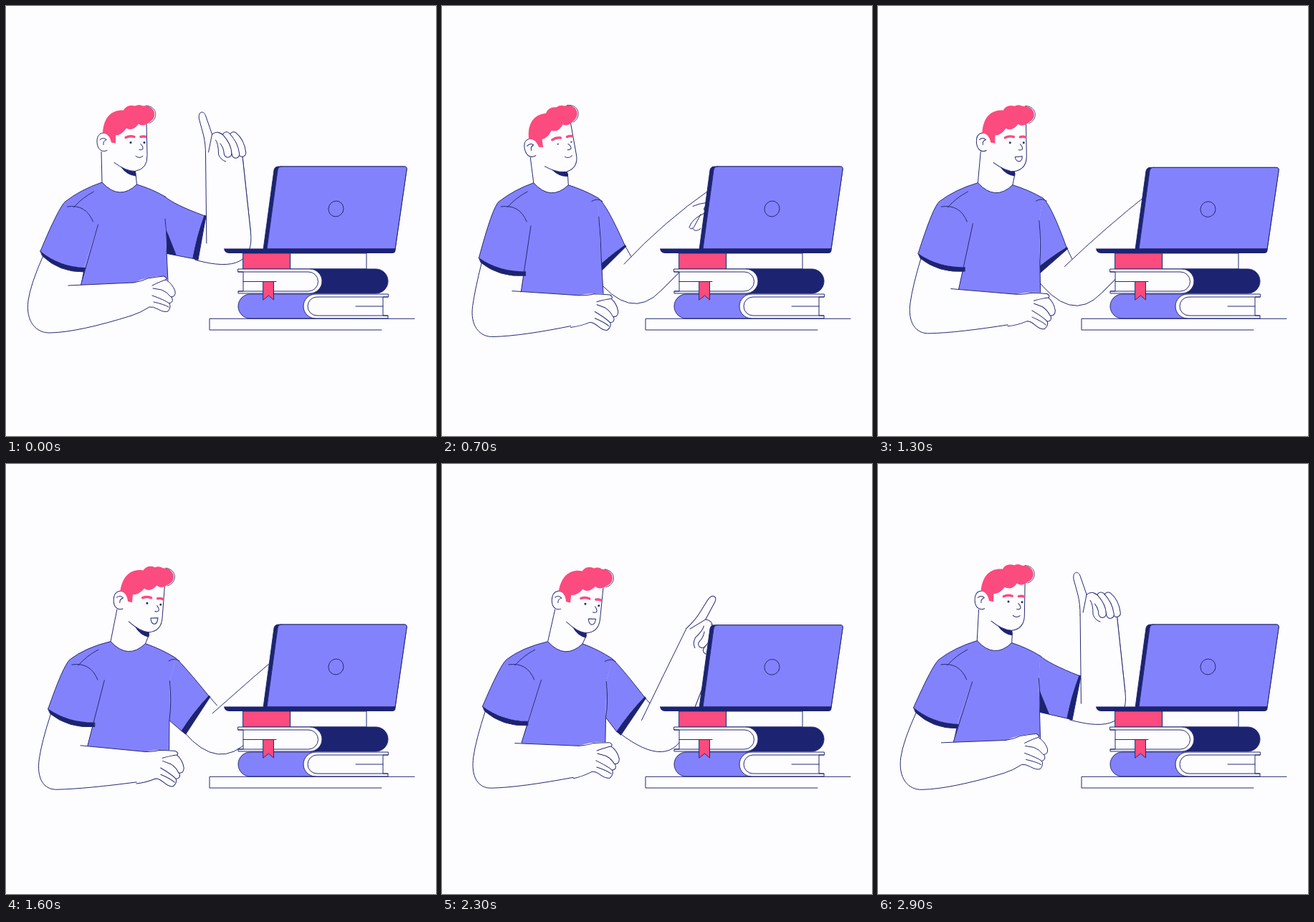
An HTML page with a canvas for the animation above (3 s loop, 600 px wide and 600 px high).

```html
<!DOCTYPE html>
<html lang="en">
<head>
<meta charset="utf-8">
<title>Lesson at the laptop</title>
<style>
html, body { margin: 0; width: 100%; height: 100%; overflow: hidden; background: #fdfcff; }
canvas { display: block; width: 600px; height: 600px; }
</style>
</head>
<body>
<canvas id="stage" width="600" height="600"></canvas>
<script>
const ctx = document.getElementById('stage').getContext('2d');
const LOOP = 3000, STEP = 100;
const PAPER = '#fdfcff', VIOLET = '#8382fd', NAVY = '#1c2371', PINK = '#fc4b7e', LINE = '#252b72';

// Smooth periodic curve through [time, value] points, without overshoot.
function curve(...keys) {
  const n = keys.length;
  const key = k => {
    const turns = Math.floor(k / n), [t, v] = keys[k - turns * n];
    return [t + turns * LOOP, v];
  };
  const slope = k => (key(k + 1)[1] - key(k)[1]) / (key(k + 1)[0] - key(k)[0]);
  const tangent = k => {
    const a = slope(k - 1), b = slope(k);
    return a * b <= 0 ? 0 : 2 * a * b / (a + b);
  };
  return time => {
    let i = n - 1;
    while (keys[i][0] > time) i--;
    const [t0, v0] = key(i), [t1, v1] = key(i + 1), h = t1 - t0, u = (time - t0) / h;
    return v0 + (v1 - v0) * u * u * (3 - 2 * u)
      + h * u * (1 - u) * (tangent(i) * (1 - u) - tangent(i + 1) * u);
  };
}

// The whole figure follows four controls.
const leanAt = curve([0, 0], [700, -.41], [1100, .03], [1600, .8], [2000, 1], [2500, .79], [2900, .28]);
const sleeveAngleAt = curve([0, 26], [700, 61], [1100, 72], [1600, 49], [2000, 46], [2500, 52], [2900, 27]);
const reachAt = curve([0, 0], [700, 1], [2000, 1], [2500, .2], [2900, 0]);
const smileAt = curve([0, 0], [700, 0], [1600, 1], [2500, .9], [2900, 0]);

const clamp = v => Math.max(0, Math.min(1, v));
const add = (p, dx, dy) => [p[0] + dx, p[1] + dy];
const mix = (a, b, u) => [a[0] + (b[0] - a[0]) * u, a[1] + (b[1] - a[1]) * u];
const mid = (a, b) => mix(a, b, .5);
function turn([x, y], degrees, origin = [0, 0]) {
  const a = degrees * Math.PI / 180, c = Math.cos(a), s = Math.sin(a);
  return [origin[0] + x * c - y * s, origin[1] + x * s + y * c];
}
function normal(a, b, size) {
  const dx = b[0] - a[0], dy = b[1] - a[1], length = Math.hypot(dx, dy) || 1;
  return [dy / length * size, -dx / length * size];
}

function poseAt(time) {
  const lean = leanAt(time), reach = reachAt(time), angle = sleeveAngleAt(time);
  const slide = reach * (2 - reach), back = Math.max(0, -lean), sway = Math.abs(lean);
  const p = { lean, reach, angle };

  p.ear = [135 + 29 * lean, 189.5 + 20 * back];
  p.tilt = 8 * lean - 4 * reach * (1 - lean);
  p.eyes = 1 - 1.3 * back;
  p.smile = smileAt(time);

  p.neckL = [134 + 15 * lean, 246 + 2 * sway];
  p.neckR = add(p.neckL, 48.5, 3);
  p.sideTop = [128.5 + 11 * lean, 305 - 4 * lean];
  p.sideEnd = [104.5 + 7 * reach + 3 * lean, 389 + 8 * reach - 5 * lean];
  p.flankTop = [222 + 8 * lean, 297 + 7 * lean];
  p.flankEnd = [226 + 2 * lean, 385 + 18 * reach];
  p.armpit = mix(p.flankTop, p.flankEnd, .55);

  p.shoulderL = [82.5 + 8 * lean, 273];
  p.hemL1 = [48 + 6 * reach + 6 * lean, 342 + 6 * reach - 8 * lean];
  p.hemL2 = add(p.hemL1, 61 + 4 * reach, 23 - 4 * reach);
  p.restInner = [87 + 13 * slide + 5 * lean, 390 + 6 * reach - 4 * lean];
  p.restTop = [178 + 14 * slide + 2 * lean, 386 + 17 * reach - 2 * lean];
  p.restBottom = [175 + 9 * slide + 2 * lean, 432 + 13 * reach - 2 * lean];
  p.restElbow = [31 + 13 * slide + 3 * lean, 411 + 5 * reach - 6 * lean];
  p.restBase = [62 + 10 * slide, 456 + 3 * reach - 6 * lean];

  // Lifted arm: shoulder, elbow and wrist as a jointed chain.
  p.shoulderR = [222 + 15 * lean + 3 * reach, 266 + 6 * sway];
  p.hemR1 = turn([50 + .4 * angle, 0], angle, p.shoulderR);
  p.hemR2 = turn([62, 0], angle + 79, p.hemR1);
  const elbow = turn([100 + .45 * angle, 0], 18 + .8 * angle, p.shoulderR);
  const aim = -92 + 50 * reach, length = 130 + 35 * reach;
  const forearm = (along, across) => turn([along, across], aim, elbow);
  p.innerEnd = forearm(6, -29);
  p.wristIn = forearm(length, -26);
  p.wristOut = forearm(length, 25);
  p.elbowOut = forearm(20, 33);
  p.elbowTurn = forearm(-43, 38);
  p.handTurn = 92 + aim + 38 * reach;

  // Fingertips show beside the screen while he sits back and types.
  const peek = clamp(reach * (1 - lean)), height = Math.min(lean, .1);
  p.knuckle = [390 - 40 * peek, 306 + 65 * height];
  p.thumb = [400 - 55 * peek, 334 + 62 * height];
  const typing = Math.sin(Math.PI * (time - 700) / 900);
  p.lid = time > 700 && time < 2500 ? 1.8 * typing * typing : 0;
  return p;
}

function fill(path, color) {
  ctx.fillStyle = color;
  ctx.fill(new Path2D(path));
}
function line(path, color = LINE, width = 1) {
  ctx.strokeStyle = color;
  ctx.lineWidth = width;
  ctx.stroke(new Path2D(path));
}
function shape(path, color) {
  fill(path, color);
  line(path);
}
function placed(origin, degrees, paint) {
  ctx.save();
  ctx.translate(...origin);
  ctx.rotate(degrees * Math.PI / 180);
  paint();
  ctx.restore();
}

function liveUpperArm(p) {
  const outer = `M${add(p.hemR2, 4, 2)}Q${p.elbowTurn} ${p.elbowOut}L${p.wristOut}`;
  const crease = turn([18, 0], p.angle, p.hemR1);
  fill(`${outer}L${p.wristIn}L${p.innerEnd}L${crease}L${p.hemR1}Z`, PAPER);
  line(outer);
  line(`M${p.hemR1}L${crease}`);
}

function liveForearm(p) {
  const bow = normal(p.innerEnd, p.wristIn, -6 * p.reach * (1 - p.lean));
  const bend = add(mid(p.innerEnd, p.wristIn), -bow[0], -bow[1]);
  const edge = `M${p.innerEnd}Q${bend} ${p.wristIn}`;
  fill(`${edge}L${p.wristOut}L${p.elbowOut}Z`, PAPER);
  line(edge);
  line(`M${p.elbowOut}L${p.wristOut}`);
  placed(p.wristIn, p.handTurn, pointingHand);

  const k = p.knuckle, t = p.thumb;
  line(`M${k}Q${add(k, 9, -4)} ${add(k, 20, -5)}`);
  line(`M${add(t, 22, -20)}Q${add(t, 4, -12)} ${t}Q${add(t, 3, 5)} ${add(t, 7, -1)}L${add(t, 16, -18)}`);
  line(`M${add(t, 5, 2)}Q${add(t, 8, 8)} ${add(t, 16, 2)}`);
}

function pointingHand() {
  const index = 'M0,1Q0,-15 -3,-27L-9,-49C-11,-60 -3,-62 0,-54L9,-28';
  fill(`${index}Q19,-34 34,-28L51,4Z`, PAPER);
  for (const finger of ['M39,-26Q49,-18 51,-2', 'M29,-26Q40,-15 42,0', 'M20,-24Q31,-12 31,-1']) {
    line(finger, LINE, 11.5);
    line(finger, PAPER, 9.5);
  }
  fill('M10,-28Q17,-32 23,-27L26,-16L15,-15Z', PAPER);
  line(index);
  line('M9,-28Q17,-34 23,-28M9,-28L4,-3M14,-20Q18,-15 18,0Q21,8 28,10');
}

function neck(p) {
  const back = turn([-2, 14], p.tilt, p.ear), front = turn([46, 44], p.tilt, p.ear);
  fill(`M${back}L${p.neckL}L${add(mid(p.neckL, p.neckR), 0, 16)}L${p.neckR}L${front}Z`, PAPER);
  line(`M${back}L${p.neckL}M${front}L${p.neckR}`);
}

function shirt(p) {
  const neckline = `Q${add(mid(p.neckL, p.neckR), 0, 25)} ${p.neckL}`;
  const slopeL = `Q${add(p.shoulderL, 22, -17)} ${p.shoulderL}`;
  const slopeR = `Q${add(mid(p.neckR, p.shoulderR), 2, -2)} ${p.shoulderR}`;
  const outerR = `Q${add(p.shoulderR, 12, 11)} ${p.hemR1}`;

  // Far sleeve with its cuff and the shadow under the arm.
  const n = normal(p.hemR1, p.hemR2, 8);
  const hemMid = add(mid(p.hemR1, p.hemR2), -n[0] * .35, -n[1] * .35);
  const cuffEnd = add(p.hemR2, n[0], n[1]), cuffTop = add(p.hemR1, n[0] * .35, n[1] * .35);
  shape(`M${p.hemR1}Q${hemMid} ${p.hemR2}L${cuffEnd}Q${mid(cuffEnd, cuffTop)} ${cuffTop}Z`, NAVY);
  fill(`M${p.shoulderR}${outerR}Q${hemMid} ${p.hemR2}L${p.armpit}L${p.flankTop}Z`, VIOLET);
  line(`M${p.hemR2}L${p.armpit}`);
  const shade = clamp((44 - p.angle) / 18);
  fill(`M${p.armpit}L${add(p.armpit, 0, -32 * shade)}L${mix(p.armpit, p.hemR2, .38 * shade)}Z`, NAVY);

  // Gap between near sleeve and torso.
  const [, top] = p.sideTop, side = mix(p.sideTop, p.sideEnd, (p.hemL2[1] - top) / (p.sideEnd[1] - top));
  fill(`M${p.hemL2}L${side}L${p.sideEnd}Z`, NAVY);
  fill(`M${p.sideTop}L${p.hemL2}L${side}Z`, VIOLET);

  fill(`M${p.neckL}${slopeL}L${p.sideTop}L${p.sideEnd}l0,9L${p.flankEnd}L${p.armpit}L${p.flankTop}`
    + `L${p.shoulderR}L${p.neckR}${neckline}Z`, VIOLET);
  fill(`M${p.neckR}${slopeR}L${p.flankTop}L${p.sideTop}Z`, VIOLET);
  line(`M${p.neckR}${neckline}${slopeL}`);
  line(`M${p.neckR}${slopeR}${outerR}`);
  line(`M${p.flankTop}Q${add(p.flankTop, 3, 30)} ${p.armpit}L${p.flankEnd}`);
  const fold = 1 - shade, s = p.shoulderR;
  line(`M${add(s, -10 * fold, 4 * fold)}Q${add(s, -2, -1)} ${add(s, 5 * fold, 4 * fold)}`);
}

function nearSleeve(p) {
  const hem = add(mid(p.hemL1, p.hemL2), -4, 10), s = p.shoulderL;
  shape(`M${p.hemL1}Q${hem} ${p.hemL2}l0,6Q${add(hem, 0, 8)} ${add(p.hemL1, 3, 7)}Z`, NAVY);
  const outer = `M${s}Q${add(s, -9, 8)} ${p.hemL1}`;
  fill(`${outer}Q${hem} ${p.hemL2}L${p.sideTop}L${add(s, 30, -10)}Z`, VIOLET);
  line(outer);
  line(`M${p.sideTop}L${p.sideEnd}`);
  line(`M${add(s, 3, 7)}Q${add(s, 29, 3)} ${add(s, 39, 28)}`);
  line(`M${add(s, 12, 8)}Q${add(s, 23, -5)} ${add(s, 40, -14)}`);
}

function restingArm(p) {
  const e = p.restElbow, b = p.restBase;
  const outer = `M${add(p.hemL1, 4, 6)}Q${add(e, 3, -22)} ${e}C${[e[0] - 4, b[1] - 16]} ${[b[0] - 20, b[1] + 1]} ${b}`
    + `Q${add(b, 40, -1)} ${p.restBottom}`;
  fill(`${outer}L${p.restTop}L${p.restInner}L${p.hemL2}Z`, PAPER);
  line(outer);
  line(`M${p.restInner}L${p.restTop}`);
  placed(p.restTop, 11 * p.reach, restingHand);
  // Cover the seam between hand and wrist.
  fill(`M${add(p.restTop, -6, 1.5)}L${add(p.restTop, 5, 2)}L${add(p.restBottom, 5, -4)}L${add(p.restBottom, -6, -1)}Z`, PAPER);
}

function restingHand() {
  fill('M0,0Q20,-9 42,-9L47,-4L58,12L57,19L54,29L48,41L22,34L-3,46Z', PAPER);
  line('M0,0Q12,-2 20,-6Q32,-8 42,-9Q48,-7 45,-4Q38,-2 26,4');
  line('M45,-4Q54,1 58,12Q59,20 52,20Q47,13 39,10L27,8');
  line('M53,20Q57,27 50,29Q43,24 26,18');
  line('M50,29Q53,34 48,40Q43,42 34,37Q27,33 22,34Q10,42 -3,46');
  line('M49,34Q42,30 28,27');
}

function head(p) {
  const face = 'M61,-27L62,18Q63,38 45,41Q32,41 16,29';
  fill('M27,36Q36,41 46,41L46,48Q34,47 25,35Z', NAVY);
  fill(`${face}L3,13L0,-12Z`, PAPER);
  line(face);
  shape('M10,-7C4,-16 -9,-14 -8,1C-7,12 0,15 6,12', PAPER);
  line('M-4,-3Q1,-7 5,-3M5,-3Q0,-1 1,4');
  fill('M0,-12C1,-35 13,-45 29,-44Q34,-53 45,-50Q51,-53 56,-50C72,-52 78,-35 66,-28'
    + 'C59,-22 54,-22 50,-25Q42,-14 33,-19Q26,-9 18,-9L18,2L12,1Q9,-12 0,-12Z', PINK);
  line('M60,-50.5C77,-50 78,-31 65,-26', LINE, .8);
  line('M32,-6Q38,-9 44,-7M53,-7Q57,-8 60,-7', PINK, 3.4);
  ctx.fillStyle = LINE;
  for (const x of [39, 58]) {
    ctx.beginPath();
    ctx.ellipse(x, 1, 1.5, 1.5 * p.eyes, 0, 0, Math.PI * 2);
    ctx.fill();
  }
  line('M53,3Q57,7 56,10Q54,12 51,11');
  const drop = 7 * p.smile;
  if (drop > .4) line(`M46,21L56,20Q56,${22 + drop} 51,${22 + drop}Q47,${21 + drop} 46,21`);
  else line('M46,20Q51,24 56,20');
}

function laptop(p) {
  ctx.save();
  ctx.translate(0, 340);
  ctx.scale(1, 1 - p.lid / 116);
  ctx.translate(0, -340);
  shape('M380,224Q375,224 374,229L359,340H543L559,229Q560,224 556,224Z', NAVY);
  shape('M384,224H556Q560,224 559,229L543,339H364L379,229Q380,224 384,224Z', VIOLET);
  ctx.beginPath();
  ctx.ellipse(460.5, 283, 10.5, 11, .4, 0, Math.PI * 2);
  ctx.stroke();
  ctx.restore();
  fill('M304,338.5H543.5V341Q543,345 539,345H311Q305,345 304,338.5Z', NAVY);
}

function books() {
  shape('M397,345H503V367H397Z', PAPER);
  shape('M331,345H396.5V367H331Z', PINK);
  shape('M424,367H516A17 17 0 0 1 516,401H424Z', NAVY);
  shape('M324,367H424A17 17 0 0 1 424,401H324V398H331V371H324Z', PAPER);
  line('M324,371H422A13.5 13.5 0 0 1 422,398H324M331,384.5H377');
  shape('M432,402H341A17 17 0 0 0 341,436H432Z', VIOLET);
  shape('M533,402H432A17 17 0 0 0 432,436H533V432H526V406H533Z', PAPER);
  line('M533,406H434A13 13 0 0 0 434,432H533M488,419H526');
  shape('M359,384.5H373.5V410L366.5,404L359,410Z', PINK);
  line('M570,436.3H284V452H524');
}

function render(time) {
  const p = poseAt(time);
  ctx.fillStyle = PAPER;
  ctx.fillRect(0, 0, 600, 600);
  ctx.lineCap = ctx.lineJoin = 'round';
  liveUpperArm(p);
  neck(p);
  placed(p.ear, p.tilt, () => head(p));
  shirt(p);
  liveForearm(p);
  restingArm(p);
  nearSleeve(p);
  books();
  laptop(p);
}

function tick() {
  const time = performance.now() % LOOP;
  render(Math.floor(time / STEP) * STEP);
  requestAnimationFrame(tick);
}
tick();
</script>
</body>
</html>
```
